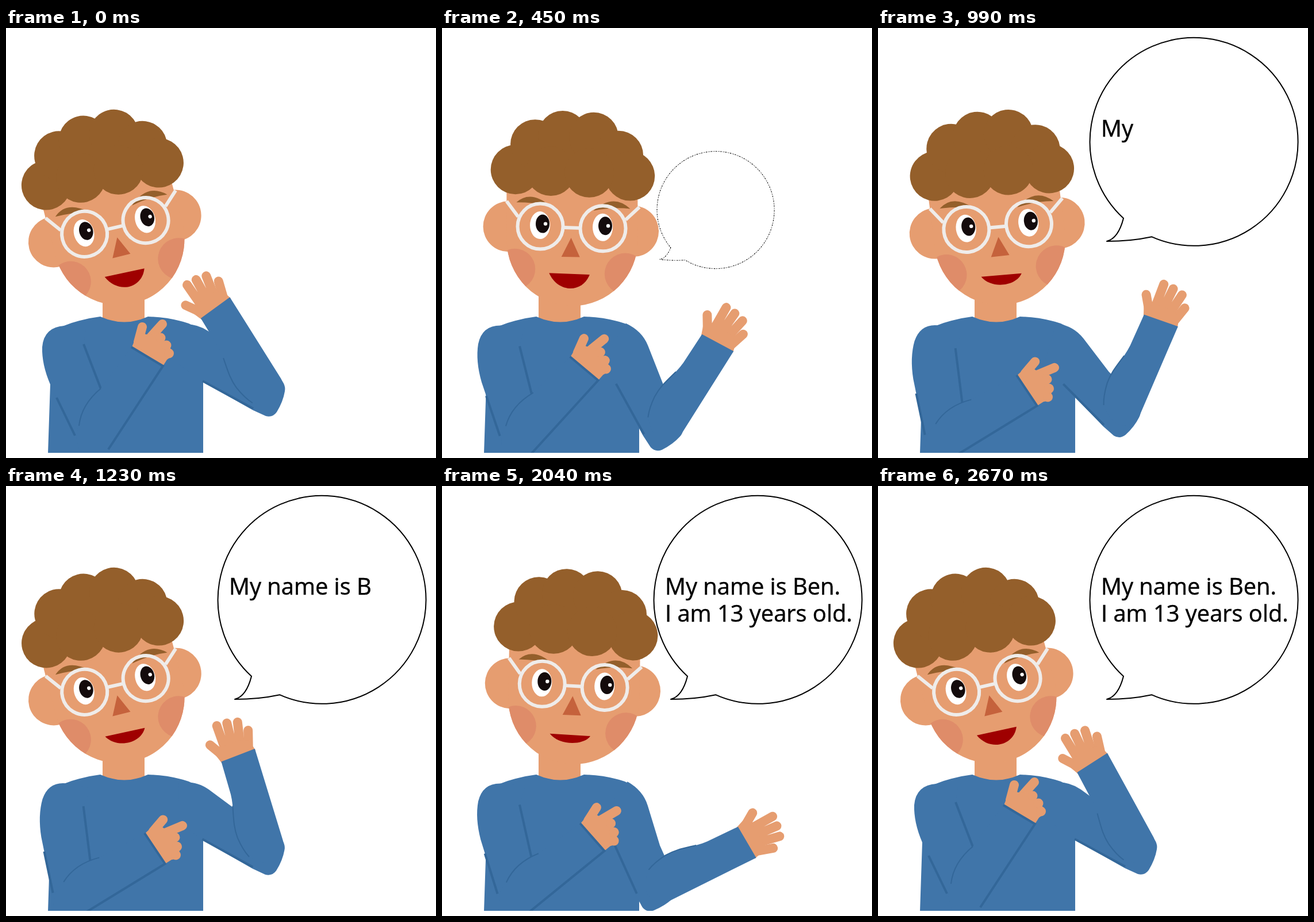
Animation, 748 px wide and 748 px high, one loop 2.7 s. Source, as an HTML page:

```html
<!DOCTYPE html>
<html lang="en">
<head>
<meta charset="utf-8">
<title>Introduction</title>
<style>
  html, body { margin: 0; width: 100%; height: 100%; overflow: hidden; background: #fff; }
  svg { display: block; width: 100%; height: 100%; }
  .blue { fill: #4075a9; }
  .skin { fill: #e69d70; }
  .hair { fill: #945f2b; }
  .fold { fill: none; stroke: #336799; stroke-width: 4; }
  .thin { stroke-width: 2; }
  .finger { fill: none; stroke: #e69d70; stroke-width: 16; stroke-linecap: round; }
  .rim { fill: none; stroke: #efecea; stroke-width: 6; }
  text { font: 39.8px "Open Sans", "Noto Sans", sans-serif; fill: #000; stroke: #000; stroke-width: 0.5; }
</style>
</head>
<body>
<svg viewBox="0 0 748 748">
  <defs>
    <clipPath id="floor"><rect width="748" height="739"/></clipPath>
    <clipPath id="jaw"><path d="M113 250H341V369A114 114.5 0 0 1 113 369Z"/></clipPath>
  </defs>

  <g clip-path="url(#floor)">
    <rect class="skin" x="168" y="440" width="73" height="76"/>
    <path class="blue" d="M164 502Q130 506 98 519L78 560L77 620L73 740H343V560Q340 523 318 514Q285 503 247 502Q206 521 164 502Z"/>

    <g id="rightArm">
      <path class="blue" d="M300 516Q331 512 353 528L412 571L470 603Q488 618 485 632Q482 650 471 668Q464 678 452 675L430 665L343 616L300 585Z"/>
      <path class="fold" d="M342 614L430 662"/>
      <g id="rightFore">
        <path class="finger" d="M-31 -203L-18 -180M-8 -230L-9 -188M10 -228L5 -188M28 -223L19 -188"/>
        <path class="finger" stroke-width="14" d="M40 -203L31 -178"/>
        <path class="skin" d="M-23 -166L-28 -182L-9 -193L19 -193L36 -186L39.500 -166Z"/>
        <path class="blue" d="M-23 -169L-28 -110C-31 -85 -44 -60 -44 -35Q-43 -12 -37 3Q-15 30 5 26Q25 20 28 -2L39.500 -169Z"/>
        <path class="fold thin" d="M-32 -90C-38 -70 -44 -55 -44 -35Q-43 -12 -37 3"/>
      </g>
    </g>

    <g id="leftArm">
      <path class="blue" d="M102 518Q66 520 63 555Q62 585 77 620L88 643L120 709H150L165 627L135 550L140 516Z"/>
      <path class="fold" d="M135 550L171 643M88 643L120 709"/>
      <g id="leftFore">
        <path class="finger" d="M237 520L230 546M272 515L246 544"/>
        <path class="skin" d="M219 555L229 530L245 533L264 534L286 557L288 571L280 577L273 588Z"/>
        <g class="skin">
          <circle cx="269" cy="539" r="8.500"/>
          <circle cx="279" cy="552" r="8.500"/>
          <circle cx="283.500" cy="566" r="8.500"/>
        </g>
        <path class="blue" d="M218 555L273 588L178 733L172 745H130L122 712Q130 655 165 627Z"/>
        <path class="fold thin" d="M165 627Q131 655 127 692"/>
        <path class="fold" d="M178 733L273 588L218 555"/>
      </g>
    </g>

    <g id="head">
      <circle class="skin" cx="116" cy="345" r="44"/>
      <circle class="skin" cx="333" cy="354" r="44.500"/>
      <path class="skin" d="M113 250H341V369A114 114.500 0 0 1 113 369Z"/>
      <g fill="#df8c69" clip-path="url(#jaw)">
        <circle cx="127" cy="419" r="35.500"/>
        <circle cx="319" cy="428" r="36"/>
      </g>
      <g class="hair" id="curls">
        <path d="M140 200H320V265H140Z"/>
        <path d="M130 303Q155 281 188 309Q160 303 130 303Z"/>
        <path d="M264 318Q299 287 328 315Q298 311 264 318Z"/>
      </g>
      <g id="eyes"></g>
      <path class="rim" d="M211 347L241 348M133 328L113 301M320 334L344 312"/>
      <circle class="rim" cx="171.500" cy="345" r="39.500"/>
      <circle class="rim" cx="280.500" cy="349" r="39.500"/>
      <path fill="#c5623c" d="M225 365L208 398L240 398.500Z"/>
      <path id="mouth" fill="#9f0000"/>
    </g>
  </g>

  <path id="bubble" fill="#fff" stroke="#000" stroke-width="2" stroke-linejoin="round"
    d="M427 331A181 181 0 1 1 476 363.200Q440 371 398 371Q418 366 427 331Z"/>
  <text id="line1" x="388" y="189"></text>
  <text id="line2" x="388" y="236"></text>
</svg>

<script>
const LOOP = 2700, HALF = LOOP / 2, TALK = 450;
const WORDS = "My name is Ben.\nI am 13 years old.";
const el = id => document.getElementById(id);
const mix = (a, b, p) => a + (b - a) * p;
const part = (t, from, span) => Math.min(1, Math.max(0, (t - from) / span));
const easeBy = n => p => p < 0.5 ? (2 * p) ** n / 2 : 1 - (2 - 2 * p) ** n / 2;
const quad = easeBy(2), cubic = easeBy(3);
const soft = p => mix(p, quad(p), 0.25);

// Goes from 0 to 1 and back again
const swing = (t, up, down, span, ease) => ease(part(t, up, span)) - ease(part(t, down, span));

function add(parent, name, attrs) {
  const node = document.createElementNS("http://www.w3.org/2000/svg", name);
  for (const key in attrs) node.setAttribute(key, attrs[key]);
  parent.appendChild(node);
}

[[128.5, 246], [163, 202], [211, 187], [265, 190], [308, 222], [328, 258], [190, 249], [257, 252]]
  .forEach(([cx, cy]) => add(el("curls"), "circle", { cx, cy, r: 43 }));

[[171, 343], [280, 347]].forEach(([x, y]) => {
  const eyes = el("eyes");
  add(eyes, "ellipse", { cx: x, cy: y, rx: 17.5, ry: 24, fill: "#fff" });
  add(eyes, "ellipse", { cx: x + 4.5, cy: y - 2.5, rx: 12, ry: 16, fill: "#140b0c" });
  add(eyes, "circle", { cx: x + 9.5, cy: y - 2.5, r: 3.2, fill: "#fff" });
});

const turn = (id, angle, x, y) => el(id).setAttribute("transform", `rotate(${angle} ${x} ${y})`);

// Linear steps through [time, value] pairs
function track(t, keys) {
  let i = 1;
  while (i < keys.length - 1 && t > keys[i][0]) i++;
  const [a, b] = [keys[i - 1], keys[i]];
  return mix(a[1], b[1], part(t, a[0], b[0] - a[0]));
}

function drawMouth(t) {
  const d = track(t % TALK, [[0, 25.5], [90, 17], [225, 13], [330, 19], [TALK, 25.5]]);
  const y = 427 + (23.5 - d) * 0.43, low = y + d / 0.75 + 1.5;
  el("mouth").setAttribute("d", `M186.500 ${y}L257 ${y + 3}C245 ${low} 202 ${low} 186.500 ${y}Z`);
}

function drawBubble(t) {
  const p = part(t, 392, 463), s = mix(0.5, 1, p), b = el("bubble");
  const x = 550 - 169 * (1 - s), y = 198 + 272 * (1 - s);
  b.setAttribute("visibility", t < 430 ? "hidden" : "visible");
  b.setAttribute("stroke-dasharray", p < 0.25 ? "2 3 4 3 1 2" : "none");
  b.setAttribute("transform",
    `translate(${x} ${y}) rotate(${8.5 * (1 - p)}) scale(${s}) translate(-550 -198)`);
}

function drawText(t) {
  const count = Math.max(0, Math.floor((t - 904) / 26.5));
  const [a, b = ""] = WORDS.slice(0, count).split("\n");
  el("line1").textContent = a;
  el("line2").textContent = b;
}

function draw(t) {
  const h = t % HALF;
  const upper = 37 * swing(h, 0, 675, 600, quad);
  const fore = mix(-36.1, 59.6, swing(h, 40, 715, 635, soft));
  turn("head", mix(-14.7, 1.1, swing(h, 15, 685, 600, cubic)), 206, 487);
  turn("rightArm", upper, 314, 549);
  el("rightFore").setAttribute("transform", `translate(457 628) rotate(${fore - upper})`);

  const v = 14 * swing(t, 0, 1643, 900, quad);
  const g = 25.3 * swing(t, 60, 1684, 920, quad);
  turn("leftArm", v, 106, 552);
  turn("leftFore", g - v, 159.5, 722);

  drawMouth(t);
  drawBubble(t);
  drawText(t);
}

const start = performance.now();
function frame() {
  draw((performance.now() - start) % LOOP);
  requestAnimationFrame(frame);
}
draw(0);
requestAnimationFrame(frame);
</script>
</body>
</html>
```
